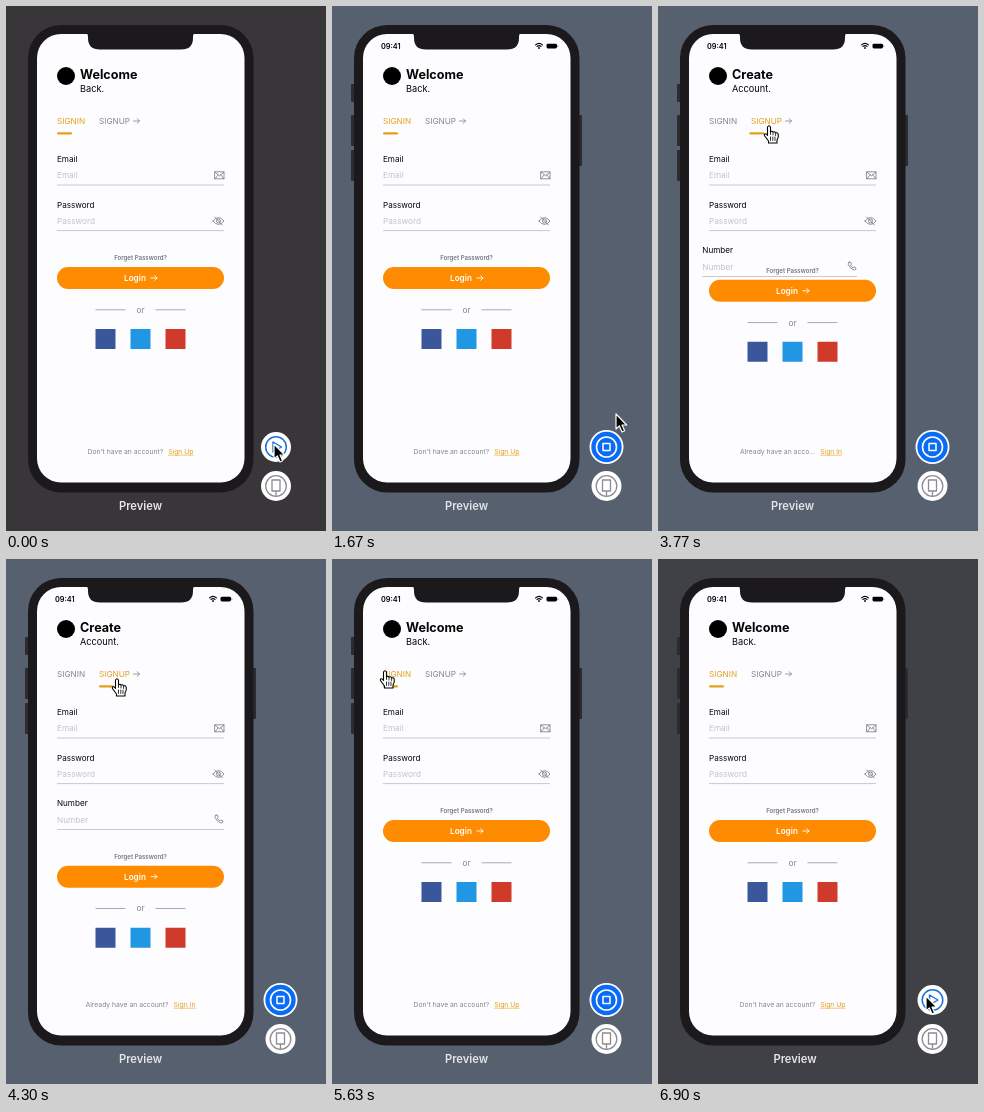
An HTML page with a canvas that plays this animation: 320 px wide and 525 px high, repeating every 6930 ms.

```html
<!DOCTYPE html>
<html lang="en">
<head>
<meta charset="utf-8">
<title>Sign-in preview</title>
<style>
html, body { margin: 0; width: 100%; height: 100%; overflow: hidden; background: #383639; }
canvas { display: block; width: 320px; height: 525px; }
</style>
</head>
<body>
<canvas id="stage"></canvas>
<script>
const LOOP = 6930;
const ORANGE = '#ff8b00', GOLD = '#e3a01b', GREY = '#85858a', PALE = '#c3c3c8', BLUE = '#0a6cf5', INK = '#050505';
const canvas = document.getElementById('stage');
const ctx = canvas.getContext('2d');
const ratio = window.devicePixelRatio || 1;
canvas.width = 320 * ratio;
canvas.height = 525 * ratio;

const clamp = v => Math.max(0, Math.min(1, v));
const mix = (a, b, p) => a + (b - a) * p;
const ramp = (t, from, to) => clamp((t - from) / (to - from));
const ease = p => p * p * (3 - 2 * p);
// Critically damped spring, settling from 0 to 1.
const spring = (ms, speed = 11.4) => {
  const k = Math.max(0, ms) / 1000 * speed;
  return 1 - (1 + k) * Math.exp(-k);
};

// Pointer stops: time, x, y
const STOPS = [[0, 268, 438], [620, 268, 438], [900, 284, 408], [2130, 284, 408], [2450, 130, 171],
  [2580, 130, 171], [2840, 111, 120], [4380, 111, 120], [4600, 53, 112], [5780, 53, 112],
  [6470, 268, 437], [LOOP, 268, 437]];

function pointerAt(t) {
  const i = Math.max(1, STOPS.findIndex(s => s[0] > t));
  const [a, b] = [STOPS[i - 1], STOPS[i]];
  const p = ease(ramp(t, a[0], b[0]));
  return [mix(a[1], b[1], p), mix(a[2], b[2], p)];
}

function text(str, x, y, size, color, weight = 400, align = 'left') {
  ctx.font = `${weight} ${size}px Inter, sans-serif`;
  ctx.textAlign = align;
  ctx.fillStyle = color;
  ctx.fillText(str, x, y);
  return ctx.measureText(str).width;
}

function box(x, y, w, h, r, color) {
  ctx.beginPath();
  ctx.roundRect(x, y, w, h, r);
  ctx.fillStyle = color;
  ctx.fill();
}

function disc(x, y, r, color) {
  ctx.beginPath();
  ctx.arc(x, y, r, 0, 7);
  ctx.fillStyle = color;
  ctx.fill();
}

function draw(d, x, y, stroke, width = 1, fill) {
  const path = new Path2D(d);
  ctx.save();
  ctx.translate(x, y);
  ctx.lineJoin = ctx.lineCap = 'round';
  ctx.lineWidth = width;
  if (fill) { ctx.fillStyle = fill; ctx.fill(path); }
  if (stroke) { ctx.strokeStyle = stroke; ctx.stroke(path); }
  ctx.restore();
}

const ring = r => `M${r} 0A${r} ${r} 0 1 1 ${-r} 0A${r} ${r} 0 1 1 ${r} 0Z`;
const ICONS = {
  arrow: 'M0 0H6M3.7-2.3L6 0L3.7 2.3',
  mail: 'M0 0H9V7H0ZM0 .3L4.5 4L9 .3M0 7L3.2 3M9 7L5.8 3',
  eye: 'M0 4Q5.5-3 11 4Q5.5 11 0 4ZM7.5 4A2 2 0 1 1 3.5 4A2 2 0 1 1 7.5 4M1.6 0L9.4 8',
  phone: 'M1 .2L2.4 0L3.4 2.2L2.4 3.2Q3.3 5 5 5.8L6 4.8L8 6L7.7 7.4Q6.8 8.4 5 7.6Q1.6 6 .2 2.4Q0 1 1 .2Z'
};

function field(label, y, icon, iconY, x = 51, right = 218) {
  text(label, x, y, 8.1, INK);
  text(label, x, y + 16.3, 8.2, PALE);
  ctx.fillStyle = '#c9c9ce';
  ctx.fillRect(x, y + 22.6, right - x, 1);
  draw(ICONS[icon], right - (icon === 'eye' ? 11 : 9), iconY, '#77777c', .8);
}

function statusBar() {
  text('09:41', 49, 42.7, 7.3, '#000', 600);
  draw('M-3.4-3.1Q0-6 3.4-3.1M-2-1.6Q0-3.3 2-1.6', 207, 42, '#000', 1.2);
  disc(207, 42, .9, '#000');
  box(214.5, 37.7, 10.5, 4.8, 1.4, '#000');
  box(225.5, 39.2, .8, 1.8, .4, '#555');
}

function footer(signup, progress) {
  const y = 447.6, size = 6.8;
  const settled = progress > .9;
  const lead = signup ? 'Already have an account?' : "Don't have an account?";
  const link = signup ? 'Sign In' : 'Sign Up';
  ctx.font = `400 ${size}px Inter, sans-serif`;
  const width = ctx.measureText(lead + link).width + 5;
  const x = settled ? 134.5 - width / 2 : 82;
  const shown = signup && !settled ? 'Already have an acco…' : lead;
  const linkX = x + text(shown, x, y, size, GREY) + 5;
  const w = text(!signup && !settled ? 'Sign…' : link, linkX, y, size, GOLD);
  ctx.fillStyle = GOLD;
  ctx.fillRect(linkX, y + 1.2, w, .6);
}

function app(t) {
  const signup = t > 3400 && t < 4668;
  const leave = spring(t - 4668);
  const push = t < 4668 ? spring(t - 3680) : 1 - leave;
  const arrive = spring(t - 3400, 13.5);
  const layout = t < 3400 ? 1 : signup ? push : leave;

  disc(60, 70, 9, '#000');
  text(signup ? 'Create' : layout < .9 ? 'Welco…' : 'Welcome', 74, 73.3, 12.6, INK, 700);
  text(signup ? 'Account.' : 'Back.', 74, 86, 9.2, INK);

  text('SIGNIN', 51, 118.2, 8.2, signup ? GREY : GOLD);
  text('SIGNUP', 93, 118.2, 8.2, signup ? GOLD : GREY);
  draw(ICONS.arrow, 127.5, 115, GREY, .8);
  box(51 + 42 * (t < 4668 ? arrive : 1 - leave), 126.3, 15, 2.2, 1.1, GOLD);

  field('Email', 155.9, 'mail', 165.8);
  field('Password', 201.5, 'eye', 211);
  if (t > 3400 && leave < .995) {
    const x = t < 4668 ? mix(-116, 51, arrive) : 51 + 167 * leave;
    const w = t < 4668 ? mix(150, 167, push) : 167;
    field('Number', 247.4, 'phone', 256, x, x + w);
  }

  ctx.save();
  ctx.translate(0, 46 * push);
  text('Forget Password?', 134.5, 254.4, 6.1, '#77777b', 600, 'center');
  box(51, 261, 167, 22, 11, ORANGE);
  text('Login', 118, 274.9, 8.2, '#fff', 600);
  draw(ICONS.arrow, 145, 272, '#fff', .9);
  ctx.fillStyle = '#aaaaae';
  ctx.fillRect(89.5, 303.3, 30, 1);
  ctx.fillRect(149.5, 303.3, 30, 1);
  text('or', 134.5, 306.8, 8.3, GREY, 400, 'center');
  ['#39579a', '#2196e3', '#d03a2b'].forEach((c, i) => box(89.5 + 35 * i, 323, 20, 20, 0, c));
  ctx.restore();

  footer(signup, layout);
}

function phone(t, live) {
  if (live) {
    [[19, 78, 18], [19, 109, 31], [19, 144, 31], [246, 109, 51]]
      .forEach(([x, y, h]) => box(x, y, 4, h, 1, '#2b2b30'));
  }
  box(22, 19, 225.5, 467.5, 33, '#1b191b');
  if (t > 560 && t < 1220) {
    box(31, 28, 207.5, 448.5, 0, '#000');
    return;
  }
  ctx.save();
  ctx.beginPath();
  ctx.roundRect(31, 28, 207.5, 448.5, 24);
  ctx.clip();
  ctx.fillStyle = '#fdfcff';
  ctx.fillRect(31, 28, 208, 449);
  app(t);
  if (live) statusBar();
  draw('M-3-1Q0-1 0 3V4Q0 15.5 12 15.5H93Q105 15.5 105 4V3Q105-1 108-1Z', 82, 28, null, 0, '#1b191b');
  ctx.restore();
}

function controls(x, running) {
  if (running) {
    disc(x, 441, 17, '#fff');
    disc(x, 441, 15.2, BLUE);
    draw(ring(10), x, 441, '#fff', 1.6);
    draw('M-3.5-3.5H3.5V3.5H-3.5Z', x, 441, '#fff', 1.5);
  } else {
    disc(x, 441, 15, '#fff');
    draw(ring(10.3), x, 441, '#1c72d2', 1.5);
    draw('M-3-5L5.5 0L-3 5Z', x, 441, '#1c72d2', 1.4);
  }
  disc(x, 480, 15, '#fff');
  draw(ring(10.3), x, 480, '#8e8b92', 1.3);
  draw('M-4-6H4V5H-4ZM0 5V10', x, 480, '#8e8b92', 1.3);
}

function pointer(t) {
  const [x, y] = pointerAt(t);
  if (x < 247) {
    draw('M-1.5 1Q0-1.5 1.5 1V6Q3 4.5 4 6.2Q5.5 5 6.6 7Q8.5 6 9.2 8.2Q10 11 8 14V17H-.5V15L-4.6 9.5Q-5 7-2.8 8L-1.5 9.4Z',
      x, y, '#000', 1.1, '#fff');
    draw('M1.5 6V8.5M4 7V9M6.6 7.5V9.5M1.5 11V14.5M3.8 11V14.5M6 11V14.5', x, y, '#000', .8);
  } else {
    draw('M0 0V15L3.4 11.9L6 18L8.6 16.8L6 11H10.7Z', x, y, '#fff', 1.2, '#000');
  }
}

function render(t) {
  const tint = t < 6730 ? ramp(t, 250, 560) : 1 - ramp(t, 6730, 6960);
  const live = t > 400;
  const running = t > 250 && t < 6730;
  const exit = ramp(t, 6730, 6880);
  ctx.setTransform(ratio, 0, 0, ratio, 0, 0);
  ctx.fillStyle = `rgb(${mix(56, 86, tint)}, ${mix(54, 96, tint)}, ${mix(57, 111, tint)})`;
  ctx.fillRect(0, 0, 320, 525);
  phone(t, live);
  text('Preview', 134.5 + 2.5 * exit, 504.3, 11.2, '#e6e5e8', 600, 'center');
  controls(270 + 4.5 * ease(ramp(t, 250, 560)), running);
  pointer(t);
}

const start = performance.now();
function tick() {
  render((performance.now() - start) % LOOP);
  requestAnimationFrame(tick);
}
tick();
</script>
</body>
</html>
```
